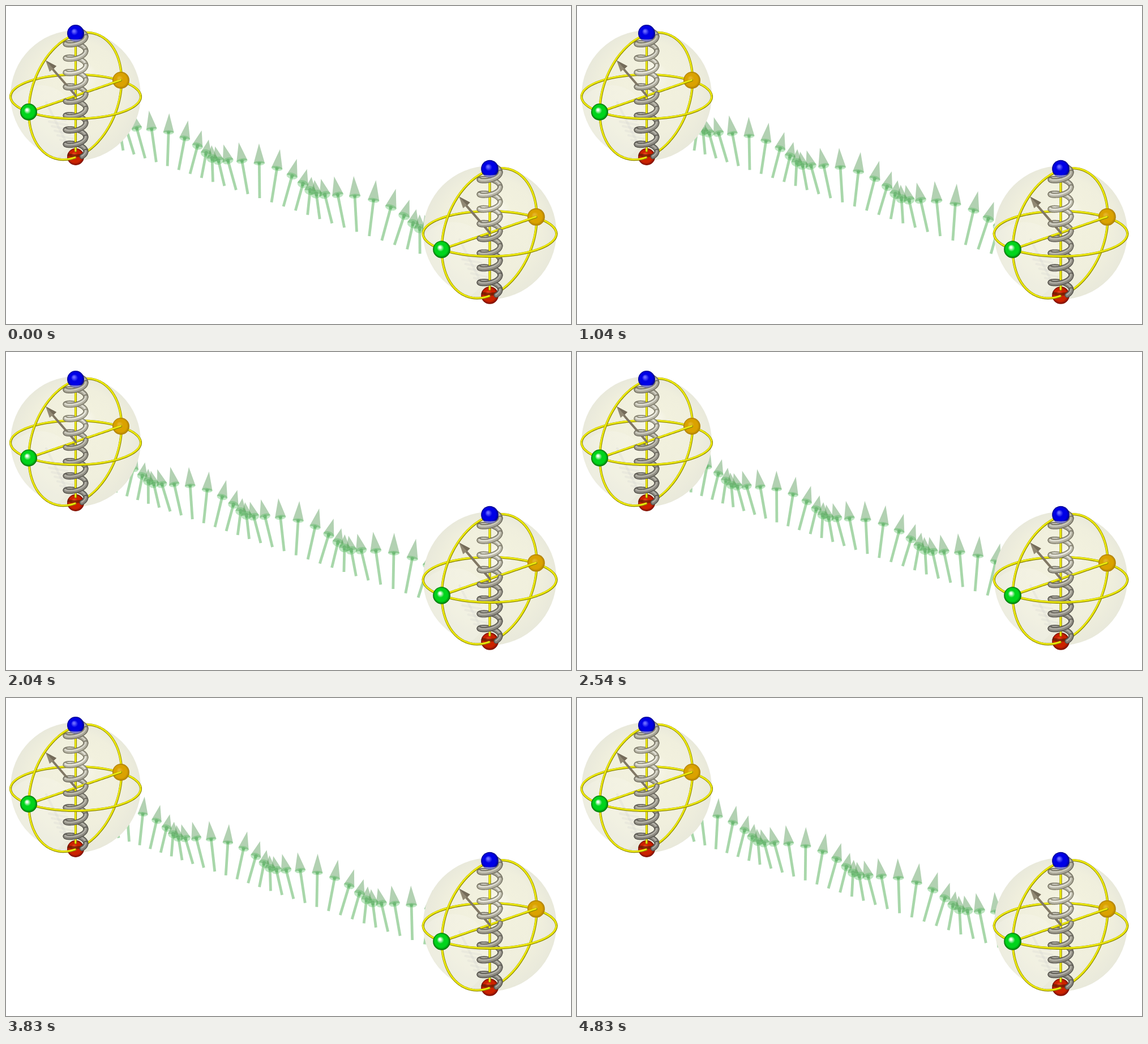
These frames come from a looping animation (998 by 561 pixels, 5080 ms). An HTML page with a canvas:

```html
<!DOCTYPE html>
<html lang="en">
<head>
<meta charset="utf-8">
<title>Spin wave between two spheres</title>
<style>
  html, body { margin: 0; width: 100%; height: 100%; overflow: hidden; background: #fff; }
  canvas { display: block; width: 100vw; height: 100vh; }
</style>
</head>
<body>
<canvas id="stage" width="998" height="561"></canvas>
<script>
const ctx = document.getElementById('stage').getContext('2d');
const TAU = Math.PI * 2;
const LOOP = 5080;

// Slow drift of the chain: [step, middle x, middle y, scale]
const DRIFT = [
  [0, 448, 339, 1], [6, 448, 339, 1], [10, 452, 335, 0.9637],
  [13, 450, 333, 0.9447], [17, 445, 334, 0.9637], [19, 444, 336, 0.983]
];

function driftAt(step) {
  const next = Math.max(1, DRIFT.findIndex(key => key[0] >= step));
  const a = DRIFT[next - 1], b = DRIFT[next];
  const k = (step - a[0]) / (b[0] - a[0]);
  return a.map((v, i) => v + (b[i] - v) * k);
}

// Each half loop holds its first pose for 290 ms and nine more for 250 ms
function stepAt(time) {
  const half = time % 2540;
  return 10 * Math.floor(time / 2540) + (half < 290 ? 0 : 1 + Math.floor((half - 290) / 250));
}

function trace(fn, from, to, count = 60) {
  ctx.beginPath();
  for (let i = 0; i <= count; i++) ctx.lineTo(...fn(from + (to - from) * i / count));
}

function stroke(color, width) {
  ctx.strokeStyle = color;
  ctx.lineWidth = width;
  ctx.stroke();
}

function polygon(points, fill) {
  ctx.beginPath();
  points.forEach(p => ctx.lineTo(...p));
  ctx.closePath();
  ctx.fillStyle = fill;
  ctx.fill();
}

function ellipse(x, y, rx, ry, fill, turn = 0) {
  ctx.beginPath();
  ctx.ellipse(x, y, rx, ry, turn, 0, TAU);
  ctx.fillStyle = fill;
  ctx.fill();
}

function clipCircle(x, y, r) {
  ctx.beginPath();
  ctx.arc(x, y, r, 0, TAU);
  ctx.clip();
}

function spinArrow(x, y, dx, dy, size) {
  const length = Math.hypot(dx, dy);
  const head = length * 0.36;
  const rx = 9.8 * size;
  const ry = rx * Math.sqrt(Math.max(0.1, 1 - (length / (105 * size)) ** 2));
  ctx.save();
  ctx.translate(x, y);
  ctx.rotate(Math.atan2(dx, -dy));
  ctx.fillStyle = 'rgba(70,170,75,.47)';
  ctx.fillRect(-2.4, head - length, 4.8, length - head);
  polygon([[-rx, head - length], [0, -length], [rx, head - length]], 'rgba(80,150,80,.44)');
  ellipse(0, head - length, rx, ry, 'rgba(75,185,85,.36)');
  ellipse(0, head - length, 3.4, ry * 0.6, 'rgba(45,145,55,.3)');
  ctx.restore();
}

function drawChain(step) {
  const [, midX, midY, scale] = driftAt(step);
  for (let n = -14; n <= 16; n++) {
    const size = scale * (1 + 0.004 * n);
    const phase = TAU * (n - 0.1 - 0.328 * step) / 8.4;
    spinArrow(
      midX + scale * (20.9 * n + 0.0677 * n * n),
      midY + scale * (7.26 * n + 0.0215 * n * n),
      size * (22.5 * Math.sin(phase) + 0.3 * (n + 2)),
      -size * (81 + 15.5 * Math.cos(phase)),
      size
    );
  }
}

function yellow(fn, from, to) {
  trace(fn, from, to);
  stroke('#8f8a00', 4.2);
  ctx.save();
  ctx.translate(-0.3, -0.5);
  trace(fn, from, to);
  stroke('#eeea0c', 2.7);
  ctx.restore();
}

function ball(x, y, r, light, main, dark) {
  const shade = ctx.createRadialGradient(x - r * 0.2, y - r * 0.25, r * 0.1, x, y, r);
  shade.addColorStop(0, light);
  shade.addColorStop(0.35, main);
  shade.addColorStop(0.72, main);
  shade.addColorStop(1, dark);
  ellipse(x, y, r, r, shade);
}

const line = (x1, y1, x2, y2) => k => [x1 + (x2 - x1) * k, y1 + (y2 - y1) * k];
const equator = a => [115 * Math.cos(a), 2 + 39 * Math.sin(a)];
const meridian = a => [-0.8 - 82 * Math.sin(a), 1 - 108.5 * Math.cos(a) + 28 * Math.sin(a)];
const helix = a => [18 * Math.cos(a), -104 + 4.03 * a + 7 * Math.sin(a)];

function tubeGradient(colors) {
  const g = ctx.createLinearGradient(0, -105, 0, 110);
  colors.forEach((c, i) => g.addColorStop([0, 0.28, 0.5, 1][i], c));
  return g;
}

function coil(from, to) {
  trace(helix, from, to, 30);
  stroke(tubeGradient(['#69665a', '#85826f', '#66635a', '#52504b']), 9);
  stroke(tubeGradient(['#a19e8f', '#bdbbab', '#9c998b', '#83817a']), 6.2);
  ctx.save();
  ctx.translate(-0.4, -1.1);
  trace(helix, from, to, 30);
  stroke(tubeGradient(['#c3c1b3', '#eeede4', '#c1bfb2', '#acaaa3']), 2.4);
  ctx.restore();
}

function shell() {
  const g = ctx.createRadialGradient(12, -42, 5, 0, 0, 115);
  g.addColorStop(0, '#f8f7ec');
  g.addColorStop(0.22, '#f2f1de');
  g.addColorStop(0.7, '#f0efdd');
  g.addColorStop(1, '#e9e9db');
  ellipse(0, 0, 115, 115, g);
  ctx.save();
  clipCircle(0, 0, 115);
  ellipse(-68, 52, 66, 72, 'rgba(246,245,238,.25)', 0.6);
  // Faint shadow of the coil on the far wall
  for (let i = 0; i < 6; i++) {
    trace(line(-52 + i * 5, 38 + i * 8, -18 + i * 3, 44 + i * 8), 0, 1, 1);
    stroke('rgba(200,200,198,.2)', 4);
  }
  trace(line(-52, 12, -14, 88), 0, 1, 1);
  stroke('rgba(200,200,198,.2)', 4);
  ctx.restore();
}

function drawSphere(x, y, scale) {
  ctx.save();
  ctx.translate(x, y);
  ctx.scale(scale, scale);
  ctx.lineCap = ctx.lineJoin = 'round';
  shell();

  yellow(equator, Math.PI, TAU);
  yellow(meridian, Math.PI, TAU);
  ball(80, -27, 15, '#e4b42a', '#daa200', '#ab7c00');
  ball(0, 108, 15, '#f04820', '#cc2200', '#750d00');
  ctx.save();
  clipCircle(0, 108, 15);
  trace(a => [17 * Math.cos(a), 101 + 5 * Math.sin(a)], 0, Math.PI);
  stroke('rgba(90,25,0,.65)', 5);
  ctx.restore();

  for (let turn = -1; turn < 8; turn++) {
    const start = turn * TAU + Math.PI;
    coil(turn < 0 ? -1.4 : start, start + Math.PI);
  }
  yellow(line(0, -98, 0, 98), 0, 1);
  yellow(line(-83, 29, 80, -27), 0, 1);

  trace(line(0, 0, -40, -46), 0, 1, 1);
  stroke('#817865', 4);
  polygon([[-53, -62], [-46, -42], [-34, -52]], '#918873');
  polygon([[-53, -62], [-39, -47], [-34, -52]], '#746b59');

  for (let turn = 0; turn < 8; turn++) coil(turn * TAU, turn * TAU + Math.PI);
  coil(8 * TAU, 8 * TAU + 0.9);

  yellow(equator, 0, Math.PI);
  yellow(meridian, 0, Math.PI);
  ball(-83, 29, 15, '#f0fff0', '#00d41c', '#006c08');
  ball(0, -110, 15, '#6a6aff', '#0000e6', '#000088');
  ctx.save();
  clipCircle(0, -110, 15);
  trace(a => [15 * Math.cos(a), -102 + 3 * Math.sin(a)], 0, Math.PI);
  ctx.lineTo(-15, -94);
  ctx.lineTo(15, -94);
  ctx.closePath();
  ctx.fillStyle = 'rgba(205,205,215,.6)';
  ctx.fill();
  ctx.restore();
  ctx.restore();
}

function render(now) {
  ctx.fillStyle = '#fff';
  ctx.fillRect(0, 0, 998, 561);
  drawChain(stepAt(now % LOOP));
  drawSphere(123, 158, 1);
  drawSphere(854.5, 399.8, 1.024);
}

const startTime = performance.now();
function tick() {
  render(performance.now() - startTime);
  requestAnimationFrame(tick);
}
tick();
</script>
</body>
</html>
```
